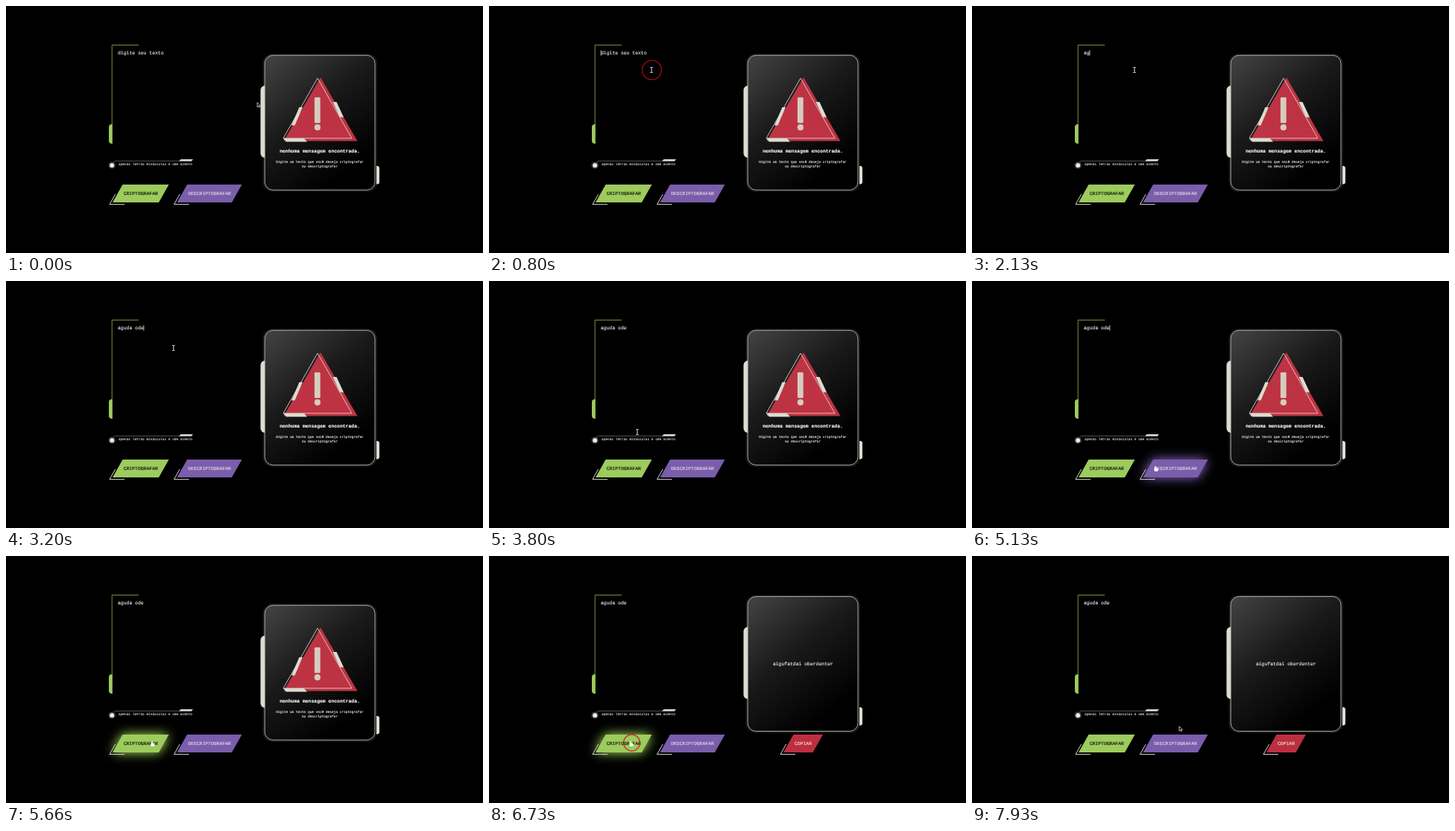
Write an HTML page with a canvas that moves like this. It is 640 by 332 pixels and loops after 8 s.

```html
<!DOCTYPE html>
<html lang="pt">
<head>
<meta charset="utf-8">
<title>Criptografar texto</title>
<style>
  html, body { margin: 0; width: 100%; height: 100%; overflow: hidden; background: #000; }
  canvas { display: block; width: 640px; height: 332px; }
</style>
</head>
<body>
<canvas id="stage"></canvas>
<script>
const W = 640, H = 332, LOOP = 8000, STEP = 1000 / 15;
const canvas = document.getElementById('stage');
const ctx = canvas.getContext('2d');
const dpr = window.devicePixelRatio || 1;
canvas.width = W * dpr;
canvas.height = H * dpr;

const MONO = '"Liberation Mono", "Courier New", monospace';
const BONE = '#dcdcd0', GREEN = '#9dcb5d', RED = '#be3343';
const SIZE = 6.42, SMALL = 4.47;

const MESSAGE = 'aguda ode';
const RULES = { e: 'enter', i: 'imes', a: 'ai', o: 'ober', u: 'ufat' };
const SECRET = MESSAGE.replace(/[eiaou]/g, c => RULES[c]);

const FOCUS = 800, TYPE_FROM = 1930, TYPE_TO = 2860, PRESS = 6600, REVEAL = 6670;
const BLINK = 530;

const HOME = { x: 338, y: 130 };
const GLIDES = [
  { from: 0, to: 660, x: 218, y: 86 },
  { from: 3130, to: 3200, x: 225, y: 89 },
  { from: 3200, to: 4060, x: 188, y: 251 },
  { from: 4265, to: 5130, x: 248, y: 251 },
  { from: 5130, to: 5660, x: 191, y: 251 },
  { from: 7600, to: 7930, x: 278, y: 229 }
];

const TOP = 240, TALL = 24, SLANT = 13.5;
const BUTTONS = [
  { x: 143, w: 62, label: 'CRIPTOGRAFAR', fill: GREEN, ink: '#10180a', glow: '#b4f066' },
  { x: 229.5, w: 73.5, label: 'DESCRIPTOGRAFAR', fill: '#7a5dab', ink: '#ded5e6', glow: '#9672d8' },
  { x: 395, w: 39.5, label: 'COPIAR', fill: '#bd2f40', ink: '#eed9d8', glow: '#e04455' }
];

function pointer(t) {
  return GLIDES.reduce((p, g) => {
    const k = Math.max(0, Math.min(1, (t - g.from) / (g.to - g.from)));
    return { x: p.x + (g.x - p.x) * k, y: p.y + (g.y - p.y) * k };
  }, HOME);
}

function isOver(b, { x, y }) {
  const depth = (y - TOP) / TALL;
  const left = b.x + SLANT * (1 - depth);
  return depth >= 0 && depth <= 1 && x >= left && x <= left + b.w;
}

function trace(points, close) {
  ctx.beginPath();
  points.forEach(([x, y]) => ctx.lineTo(x, y));
  if (close) ctx.closePath();
}

function fill(color) {
  ctx.fillStyle = color;
  ctx.fill();
}

function stroke(color, width = 1) {
  ctx.strokeStyle = color;
  ctx.lineWidth = width;
  ctx.stroke();
}

// Parallelogram standing on (x, y + h), its top edge moved right by slant.
function slab(x, y, w, h, slant, color) {
  trace([[x + slant, y], [x + slant + w, y], [x + w, y + h], [x, y + h]], true);
  fill(color);
}

function triangle(x, y, w, h) {
  trace([[x, y], [x + w / 2, y + h], [x - w / 2, y + h]], true);
}

function box(x, y, w, h, r, color) {
  ctx.beginPath();
  ctx.roundRect(x, y, w, h, r);
  fill(color);
}

function dot(x, y, r, color) {
  ctx.beginPath();
  ctx.arc(x, y, r, 0, Math.PI * 2);
  fill(color);
}

function text(str, x, y, size, color, align = 'left', weight = 'normal') {
  ctx.font = `${weight} ${size}px ${MONO}`;
  ctx.textAlign = align;
  ctx.fillStyle = ctx.strokeStyle = color;
  ctx.lineWidth = 0.18;
  ctx.fillText(str, x, y);
  ctx.strokeText(str, x, y);
}

function typedCount(t) {
  const gap = (TYPE_TO - TYPE_FROM) / (MESSAGE.length - 1);
  return Math.max(0, Math.min(MESSAGE.length, Math.floor((t - TYPE_FROM) / gap + 1.01)));
}

function caretOn(t, typed) {
  const idle = t - (typed ? TYPE_TO : FOCUS + 130);
  return t >= FOCUS && t < PRESS && idle % (2 * BLINK) < BLINK;
}

function drawInput(t) {
  trace([[142.2, 185], [142.2, 52.5], [178, 52.5]]);
  stroke('#8ba043', 0.9);
  box(138, 159, 4.6, 26, [4, 0, 0, 4], GREEN);

  const typed = typedCount(t);
  text(typed ? MESSAGE.slice(0, typed) : 'digite seu texto', 150, 65, SIZE, '#dcdcdc');
  if (caretOn(t, typed)) {
    ctx.fillStyle = '#e6e6e6';
    ctx.fillRect(149.8 + typed * SIZE * 0.6, 59.3, 0.8, 7.4);
  }

  trace([[143, 211], [146.5, 208.3], [250, 208.3]]);
  stroke('#777', 0.7);
  slab(232, 206, 16.5, 2.6, 2.6, BONE);
  dot(142.2, 214.2, 4.8, '#3c3c3c');
  dot(142.2, 214.2, 2.9, '#ecece6');
  text('apenas letras minúsculas e sem acento', 151, 213.6, SMALL, '#bcbcbc');
}

function drawButton({ x, w, label, fill: color, ink, glow }, hot) {
  ctx.save();
  if (hot) {
    ctx.shadowColor = glow;
    ctx.shadowBlur = 15 * dpr;
  }
  slab(x, TOP, w, TALL, SLANT, color);
  ctx.restore();
  trace([[x + 3.7, 253], [x - 4, 266.6], [x + 16, 266.6]]);
  stroke('#d9d9d4');
  text(label, x + (w + SLANT) / 2, 254.4, SIZE, ink, 'center');
}

function drawWarning() {
  triangle(422, 96, 99, 85.5);
  fill(RED);
  slab(376, 178, 28, 4.6, -4, BONE);
  slab(383, 136, 4.5, 24.5, 10.5, BONE);
  slab(448, 129, 5, 20.5, -9.5, BONE);
  triangle(418, 97, 92, 80.8);
  stroke('#ddd0cb', 0.9);
  box(413.9, 122.8, 7.8, 34.5, 1.4, '#d5ccbf');
  dot(417.9, 163.2, 4.1, '#d5ccbf');
  text('nenhuma mensagem encontrada.', 421, 197, SIZE, '#f0f0f0', 'center', 'bold');
  text('Digite um texto que você deseja criptografar', 421, 211.4, SMALL, '#d0d0d0', 'center');
  text('ou descriptografar', 421, 216.8, SMALL, '#d0d0d0', 'center');
}

function drawCard(done) {
  ctx.save();
  if (done) ctx.translate(0, -11.8);
  box(344.6, 64.3, 153.2, 185.4, 13, '#1b1b1b');
  box(341.5, 107, 6.5, 97, [6, 0, 0, 6], BONE);
  box(497, 215, 4, 24.5, [0, 3, 3, 0], BONE);
  const shade = ctx.createLinearGradient(347, 66, 468, 214);
  shade.addColorStop(0, '#444');
  shade.addColorStop(0.5, '#1a1a1a');
  shade.addColorStop(1, '#000');
  box(347.2, 66.3, 147.8, 181, 11, shade);
  stroke('#b8b8b4', 0.9);
  if (!done) drawWarning();
  ctx.restore();
  if (done) text(SECRET, 421.3, 147, SIZE, '#dedede', 'center');
}

function drawClick(age, { x, y }) {
  if (age < 0 || age >= 200) return;
  ctx.beginPath();
  ctx.arc(x + 0.5, y, 13 - 2 * Math.min(1, age / 133), 0, Math.PI * 2);
  stroke('rgba(205, 12, 24, .75)', 1.4);
}

function drawPointer(pos, hot) {
  const { x, y } = pos;
  ctx.save();
  ctx.translate(x, y);
  if (hot) {
    box(-1.8, -2.2, 1.6, 5, 0.8, '#fff');
    box(-2.6, 0.4, 5.2, 4.4, 1.6, '#fff');
  } else if (x > 142 && x < 325 && y > 52 && y < 206) {
    box(-0.5, -3, 1, 6, 0, '#eee');
    box(-2, -3.8, 4, 0.8, 0, '#ddd');
    box(-2, 3, 4, 0.8, 0, '#ddd');
  } else {
    trace([[0, 0], [0, 6.2], [1.6, 4.8], [2.9, 7], [2.5, 4.6], [4.4, 4.5]], true);
    fill('#000');
    stroke('#e4e4e4', 0.8);
  }
  ctx.restore();
}

function draw(now) {
  // 15 pictures per second, held between steps
  const t = Math.floor(((now % LOOP) + 5) / STEP) * STEP % LOOP + 5;
  const pos = pointer(t);
  const done = t >= REVEAL;
  const buttons = BUTTONS.slice(0, done ? 3 : 2);
  const hovered = buttons.find(b => isOver(b, pos));

  ctx.setTransform(dpr, 0, 0, dpr, 0, 0);
  ctx.textRendering = 'geometricPrecision';
  ctx.fillStyle = '#000';
  ctx.fillRect(0, 0, W, H);
  drawInput(t);
  drawCard(done);
  buttons.forEach(b => drawButton(b, b === hovered));
  drawClick(t - FOCUS, pos);
  drawClick(t - PRESS, pos);
  drawPointer(pos, hovered);
}

const start = performance.now();
function tick() {
  draw(performance.now() - start);
  requestAnimationFrame(tick);
}
tick();
</script>
</body>
</html>
```
